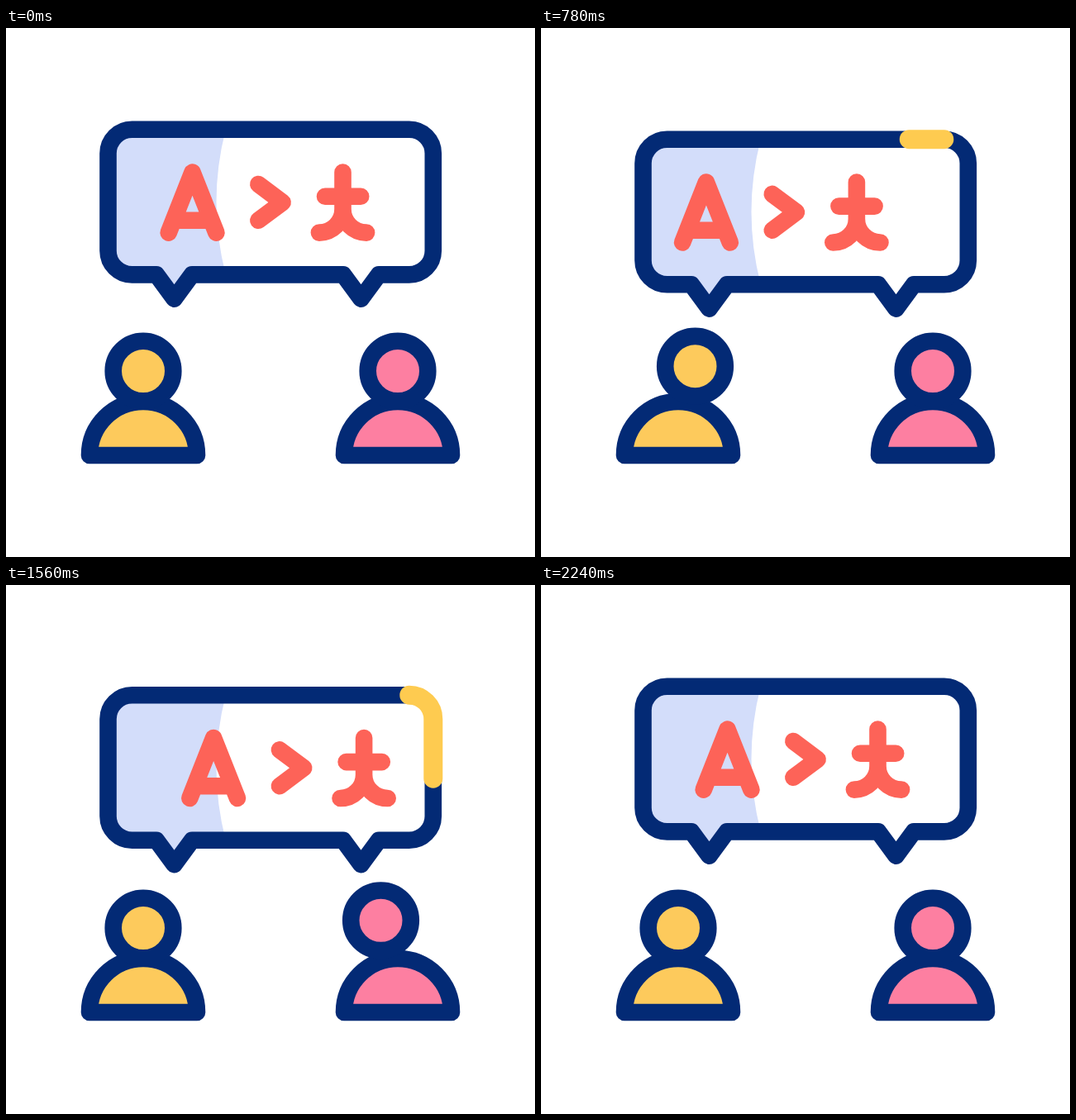
An HTML page with a canvas for the animation above (2.4 s loop, 640 px wide and 640 px high).

```html
<!DOCTYPE html>
<html lang="en">
<head>
<meta charset="utf-8">
<title>Translation chat</title>
<style>
  html, body { margin: 0; width: 100%; height: 100%; overflow: hidden; background: #fff; }
  canvas { display: block; width: 640px; height: 640px; }
</style>
</head>
<body>
<canvas id="stage"></canvas>
<script>
const SIZE = 640, LOOP = 2400, END = 2230;
const NAVY = '#032a75', BLUE = '#d3ddfa', RED = '#fd6358';
const YELLOW = '#fdca5c', PINK = '#fd7fa1', GLOW = '#fecb50';
const LINE = 20.6;

const canvas = document.getElementById('stage');
const ctx = canvas.getContext('2d');
const dpr = window.devicePixelRatio || 1;
canvas.width = canvas.height = SIZE * dpr;

// Keys are [time, value] pairs, eased in and out between each pair.
function track(t, keys) {
  if (t <= keys[0][0]) return keys[0][1];
  for (let i = 1; i < keys.length; i++) {
    const [t0, a] = keys[i - 1], [t1, b] = keys[i];
    if (t < t1) {
      const u = (t - t0) / (t1 - t0);
      return a + (b - a) * u * u * (3 - 2 * u);
    }
  }
  return keys[keys.length - 1][1];
}

const BOB = [[200, 0], [700, 12.8], [1200, 0], [1700, 12.8], [END, 0]];
const SLIDE = [[200, 0], [400, -25.6], [1000, -25.6], [1200, 0], [1400, 25.6], [2000, 25.6], [END, 0]];
const LEFT_X = [[200, 0], [400, 20.5], [1000, 20.5], [1200, 0]];
const LEFT_Y = [[400, 0], [600, -10.2], [1000, 0]];
const RIGHT_X = [[1200, 0], [1400, -20.5], [2000, -20.5], [END, 0]];
const RIGHT_Y = [[1400, 0], [1600, -10.2], [2000, 0]];
const TRIM_END = [[700, 0], [1400, 1]];
const TRIM_START = [[1000, 0], [1700, 1]];

// Bubble outline, counterclockwise from the top right corner.
const box = { l: 123.5, r: 516.8, t: 122.8, b: 298.4, c: 29 };
const tail = { w: 21.5, h: 29.3, left: 203.5, right: 429.5 };

function makeBubble() {
  const { l, r, t, b, c } = box;
  const p = new Path2D();
  p.moveTo(r - c, t);
  p.lineTo(l + c, t);
  p.arcTo(l, t, l, t + c, c);
  p.lineTo(l, b - c);
  p.arcTo(l, b, l + c, b, c);
  for (const x of [tail.left, tail.right]) {
    p.lineTo(x - tail.w, b);
    p.lineTo(x, b + tail.h);
    p.lineTo(x + tail.w, b);
  }
  p.lineTo(r - c, b);
  p.arcTo(r, b, r, b - c, c);
  p.lineTo(r, t + c);
  p.arcTo(r, t, r - c, t, c);
  return p;
}

const bubble = makeBubble();
const outline = new Path2D(bubble);
outline.closePath();
const bubbleLength = 2 * (box.r - box.l + box.b - box.t - 4 * box.c)
  + 2 * Math.PI * box.c
  + 4 * (Math.hypot(tail.w, tail.h) - tail.w);

const shade = new Path2D('M100 122.8H265.8Q243.2 210.6 265.8 298.4V345H100Z');

const glyphs = new Path2D(
  'M196.7 247.6L225.5 174.6L254.4 247.6M202.6 232.8H248.4' +
  'M305.3 189L334.6 210.9L305.3 232.8' +
  'M407.5 174.6V219A28.6 28.6 0 0 1 378.9 247.6' +
  'M407.5 219A28.6 28.6 0 0 0 436.1 247.6' +
  'M386 203.7H429.2'
);

function stroke(path, color, width = LINE) {
  ctx.strokeStyle = color;
  ctx.lineWidth = width;
  ctx.stroke(path);
}

function person(x, color, dx, dy) {
  const body = new Path2D(), head = new Path2D();
  body.arc(x, 517, 65, Math.PI, 0);
  body.closePath();
  head.arc(x + dx, 415 + dy, 36.3, 0, 2 * Math.PI);
  for (const part of [body, head]) {
    ctx.fillStyle = color;
    ctx.fill(part);
    stroke(part, NAVY);
  }
}

function drawTrim(from, to) {
  if (to - from < 0.0005) return;
  ctx.setLineDash([(to - from) * bubbleLength, 2 * bubbleLength]);
  ctx.lineDashOffset = -from * bubbleLength;
  stroke(bubble, GLOW, 23);
  ctx.setLineDash([]);
}

function drawBubble(t) {
  ctx.save();
  ctx.translate(0, track(t, BOB));

  ctx.save();
  ctx.clip(outline);
  ctx.fillStyle = BLUE;
  ctx.fill(shade);
  ctx.restore();

  stroke(outline, NAVY);
  drawTrim(track(t, TRIM_START), track(t, TRIM_END));

  ctx.translate(track(t, SLIDE), 0);
  stroke(glyphs, RED);
  ctx.restore();
}

function draw(t) {
  ctx.setTransform(dpr, 0, 0, dpr, 0, 0);
  ctx.fillStyle = '#fff';
  ctx.fillRect(0, 0, SIZE, SIZE);
  ctx.lineCap = ctx.lineJoin = 'round';
  person(166, YELLOW, track(t, LEFT_X), track(t, LEFT_Y));
  person(474, PINK, track(t, RIGHT_X), track(t, RIGHT_Y));
  drawBubble(t);
}

const began = performance.now();
function frame() {
  draw((performance.now() - began) % LOOP);
  requestAnimationFrame(frame);
}
frame();
</script>
</body>
</html>
```
